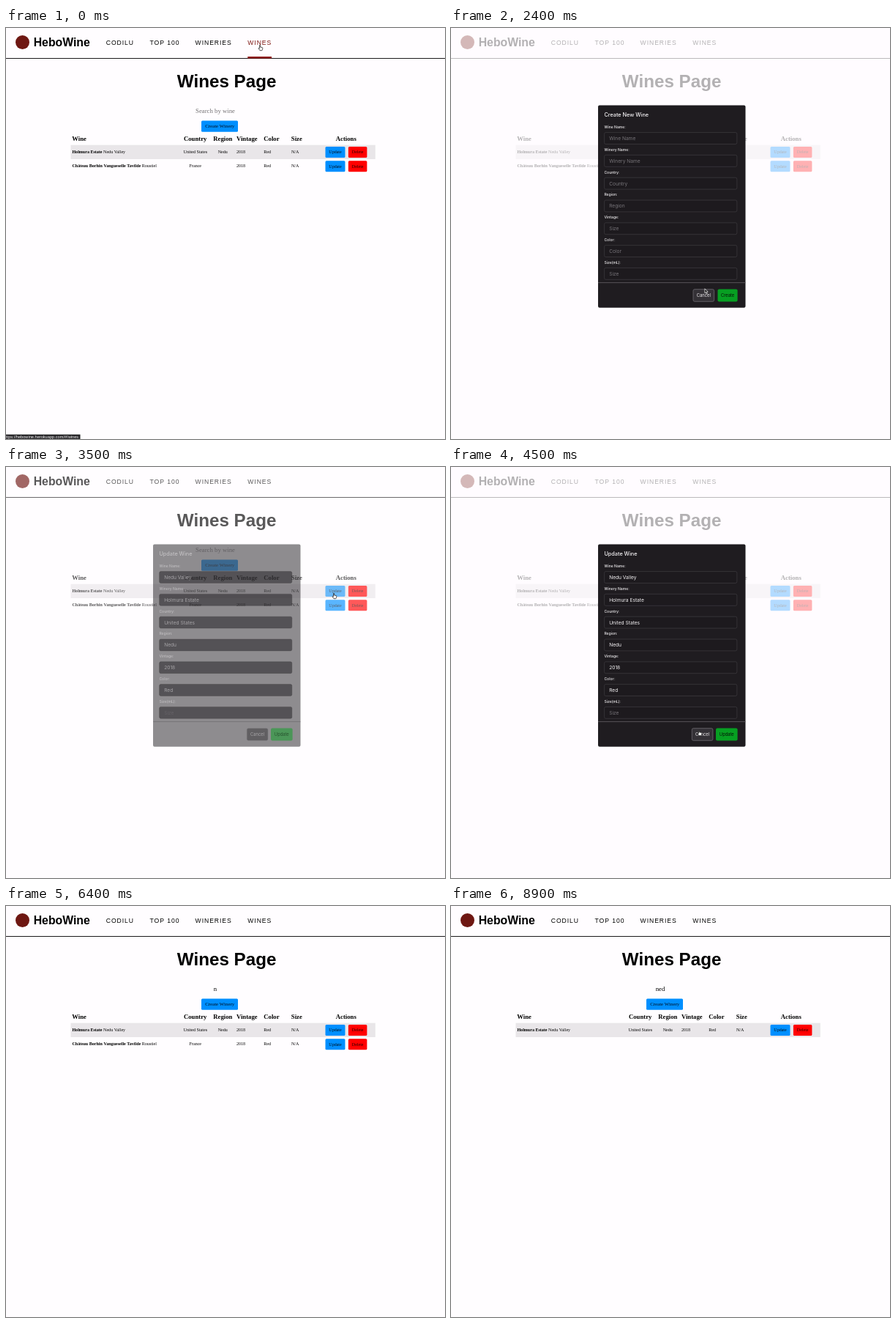
Animation, 600 px wide and 561 px high, one loop 9000 ms. Source, as an HTML page with a canvas:

```html
<!DOCTYPE html>
<html lang="en">
<head>
<meta charset="utf-8">
<title>Wines Page</title>
<style>
html, body { margin: 0; width: 100%; height: 100%; overflow: hidden; background: #fffdff; }
canvas { display: block; width: 600px; height: 561px; }
</style>
</head>
<body>
<canvas id="stage"></canvas>
<script>
const W = 600, H = 561, LOOP = 9000, STEP = 100;
const SERIF = '"Liberation Serif", Times, serif';
const SANS = '"Liberation Sans", Arial, sans-serif';
const UI = 'Inter, "Liberation Sans", sans-serif';
const BG = '#fffdff', BLUE = '#008fff', BLUE_HOVER = '#1b95f4', RED = '#ff0000', PANEL = '#1f1c20';

const canvas = document.getElementById('stage');
const ctx = canvas.getContext('2d');
const dpr = window.devicePixelRatio || 1;
canvas.width = Math.round(W * dpr);
canvas.height = Math.round(H * dpr);

const wines = [
  { winery: 'Holmura Estate', name: 'Nedu Valley', country: 'United States', region: 'Nedu' },
  { winery: 'Château Borhin Vangueselle Tavilde', name: 'Roustiel', country: 'France', region: '' }
];

const labels = ['Wine Name:', 'Winery Name:', 'Country:', 'Region:', 'Vintage:', 'Color:', 'Size(mL):'];
const hints = ['Wine Name', 'Winery Name', 'Country', 'Region', 'Size', 'Color', 'Size'];
const dialogs = [
  { open: 1400, close: 2600, title: 'Create New Wine', action: 'Create', actionX: 364.5, cancelX: 331, values: [] },
  { open: 3500, close: 4700, title: 'Update Wine', action: 'Update', actionX: 362, cancelX: 329.3,
    values: ['Nedu Valley', 'Holmura Estate', 'United States', 'Nedu', '2018', 'Red'] }
];

// pointer moves: start, end, target x, target y
const start = [348, 27];
const moves = [
  [300, 1000, 292, 135],
  [1600, 2400, 348.5, 359],
  [2600, 3200, 449, 176],
  [3600, 4400, 340, 363],
  [4700, 5150, 287, 133],
  [5300, 5500, 287, 114]
];
const HIDE_POINTER = 6300, STATUS_END = 600;

const typed = [[0, ''], [6400, 'n'], [6800, 'nb'], [7400, 'n'], [7600, 'ne'], [7800, 'ned']];

function text(str, x, y, font, color = '#000', align = 'left', spacing = 0) {
  ctx.font = font;
  ctx.fillStyle = color;
  ctx.textAlign = align;
  ctx.letterSpacing = spacing + 'px';
  ctx.fillText(str, x, y);
}

function rect(x, y, w, h, color) {
  ctx.fillStyle = color;
  ctx.fillRect(x, y, w, h);
}

function box(x, y, w, h, r, fill, stroke) {
  ctx.beginPath();
  ctx.roundRect(x, y, w, h, r);
  if (fill) { ctx.fillStyle = fill; ctx.fill(); }
  if (stroke) { ctx.strokeStyle = stroke; ctx.lineWidth = 0.7; ctx.stroke(); }
}

function pointerAt(t) {
  let [x, y] = start, resting = true;
  for (const [from, to, tx, ty] of moves) {
    if (t <= from) break;
    const p = Math.min(1, (t - from) / (to - from));
    const e = 1 - (1 - p) ** 2.2;
    x += (tx - x) * e;
    y += (ty - y) * e;
    resting = t > to;
  }
  const beam = t >= 5500;
  return { x, y, kind: beam ? 'beam' : resting ? 'hand' : 'arrow' };
}

function query(t) {
  return typed.filter(k => k[0] <= t).pop()[1];
}

function header(hover) {
  ctx.beginPath();
  ctx.arc(22.5, 19.5, 9.5, 0, Math.PI * 2);
  ctx.fillStyle = '#6e1712';
  ctx.fill();
  text('HeboWine', 37.7, 25.2, 'bold 15.8px ' + SANS);
  const nav = [['CODILU', 136.8], ['TOP 100', 196.5], ['WINERIES', 258.6], ['WINES', 330.3]];
  for (const [name, x] of nav) {
    const on = hover && name === 'WINES';
    text(name, x, 22.8, '8.6px ' + SANS, on ? '#7d1510' : '#000', 'left', 0.95);
  }
  rect(0, 41, W, 1, '#1c1a1c');
  if (hover) rect(330.3, 39, 32.7, 2.5, '#8f1512');
}

function button(label, x, y, w, color) {
  box(x, y, w, 15, 1.5, color);
  text(label, x + w / 2, y + 9.3, '6.05px ' + SERIF, color === RED ? '#2c0000' : '#00101c', 'center');
}

function table(rows, hoverUpdate) {
  const heads = [['Wine', 90.3], ['Country', 243], ['Region', 283.3], ['Vintage', 315],
    ['Color', 352.3], ['Size', 389.8], ['Actions', 450.8]];
  for (const [name, x] of heads) text(name, x, 153.6, 'bold 8.7px ' + SERIF);
  const font = '6.05px ' + SERIF;
  rows.forEach((wine, i) => {
    const y = 171.1 + i * 19.3;
    if (i === 0) rect(88.5, 159.7, 416.3, 19.3, '#e9e6e9');
    text(wine.winery, 90.4, y, 'bold ' + font);
    const nameX = 90.4 + ctx.measureText(wine.winery + ' ').width;
    text(wine.name, nameX, y, font);
    text(wine.country, 258.8, y, font, '#000', 'center');
    text(wine.region, 296.2, y, font, '#000', 'center');
    text('2018', 315, y, font);
    text('Red', 352.3, y, font);
    text('N/A', 389.9, y, font);
    button('Update', 436.5, y - 9.2, 27, hoverUpdate && i === 0 ? BLUE_HOVER : BLUE);
    button('Delete', 467.9, y - 9.2, 25.5, RED);
  });
}

function page(t, pointer) {
  const at = (x, y, w, h) => t < HIDE_POINTER &&
    pointer.x > x && pointer.x < x + w && pointer.y > y && pointer.y < y + h;
  rect(0, 0, W, H, BG);
  header(at(328, 10, 36, 32));
  text('Wines Page', 301.6, 81.4, 'bold 24.2px ' + SANS, '#000', 'center');
  const q = query(t);
  text(q || 'Search by wine', 286, 116, '8.75px ' + SERIF, q ? '#000' : '#757375', 'center');
  box(267, 126.5, 50, 15.3, 1.5, at(267, 126, 50, 16) ? BLUE_HOVER : BLUE);
  text('Create Winery', 292.2, 136.2, '6.9px ' + SERIF, '#00101c', 'center');
  const rows = wines.filter(w => Object.values(w).join(' ').toLowerCase().includes(q));
  const shown = q.length > 1 ? rows.filter(w => w.region.toLowerCase().startsWith(q)) : rows;
  table(shown, at(436, 162, 28, 16));
  if (t < STATUS_END) {
    rect(0, 554.8, 101.5, 6.2, '#29282b');
    text('ttps://hebowine.herokuapp.com/#/wines', 0, 560.4, '5.65px ' + SANS, '#f4f2f4');
  }
}

function dialog(d, t) {
  const p = Math.min(1, (t - d.open + STEP) / 200, (d.close - t) / 200);
  ctx.globalAlpha = 0.7 * p;
  rect(0, 0, W, H, BG);
  ctx.globalAlpha = p;
  box(201, 105.4, 201.5, 276.3, 2, PANEL);
  text(d.title, 209.4, 121.3, '500 7.3px ' + UI, '#f5f3f5');
  labels.forEach((label, i) => {
    const y = 135 + i * 30.8;
    text(label, 209.4, y + 1.9, '500 5.05px ' + UI, '#f0eef0');
    box(209.6, y + 7.6, 181.2, 15.9, 2, '#1d1a1e', '#403d41');
    const value = d.values[i];
    text(value || hints[i], 216.2, y + 18, '6.62px ' + UI, value ? '#f5f3f5' : '#777479');
  });
  rect(201, 347.2, 201.5, 0.9, '#5b585c');
  box(d.cancelX, 356.7, 28.6, 16.6, 2, '#343136', '#77747a');
  text('Cancel', d.cancelX + 14.3, 367.1, '5.8px ' + UI, '#f0eef0', 'center');
  const w = 391.6 - d.actionX;
  box(d.actionX, 356.4, w, 17.1, 2, '#079f22');
  text(d.action, d.actionX + w / 2, 367.1, '5.8px ' + UI, '#041006', 'center');
  ctx.globalAlpha = 1;
}

function polygon(points) {
  ctx.beginPath();
  points.forEach(([x, y]) => ctx.lineTo(x, y));
  ctx.closePath();
  ctx.fill();
  ctx.stroke();
}

function drawPointer({ x, y, kind }) {
  ctx.save();
  ctx.translate(x, y);
  ctx.lineJoin = 'round';
  ctx.lineWidth = 0.7;
  if (kind === 'arrow') {
    ctx.fillStyle = '#111';
    ctx.strokeStyle = '#fff';
    polygon([[-1.6, -3.2], [-1.6, 2.7], [-0.2, 1.5], [0.8, 3.8], [1.8, 3.4], [0.8, 1.2], [2.7, 1.1]]);
  } else if (kind === 'hand') {
    ctx.fillStyle = '#fff';
    ctx.strokeStyle = '#111';
    polygon([[-1.4, -3.6], [-0.5, -3.6], [-0.3, -0.9], [2.2, -0.5], [2.9, 0.2], [2.5, 2.4],
      [1.9, 3.7], [-1, 3.7], [-2.9, 0.8], [-2.4, 0.1], [-1.4, 0.8]]);
  } else {
    ctx.strokeStyle = '#222';
    ctx.beginPath();
    ctx.moveTo(-1.2, -3.6);
    ctx.lineTo(1.2, -3.6);
    ctx.moveTo(0, -3.6);
    ctx.lineTo(0, 3.6);
    ctx.moveTo(-1.2, 3.6);
    ctx.lineTo(1.2, 3.6);
    ctx.stroke();
  }
  ctx.restore();
}

function draw(t) {
  ctx.setTransform(dpr, 0, 0, dpr, 0, 0);
  const pointer = pointerAt(t);
  page(t, pointer);
  for (const d of dialogs) if (t >= d.open && t < d.close) dialog(d, t);
  if (t < HIDE_POINTER) drawPointer(pointer);
}

const begin = performance.now();
function tick() {
  const t = (performance.now() - begin) % LOOP;
  draw(Math.floor(t / STEP) * STEP);
  requestAnimationFrame(tick);
}
tick();
</script>
</body>
</html>
```
